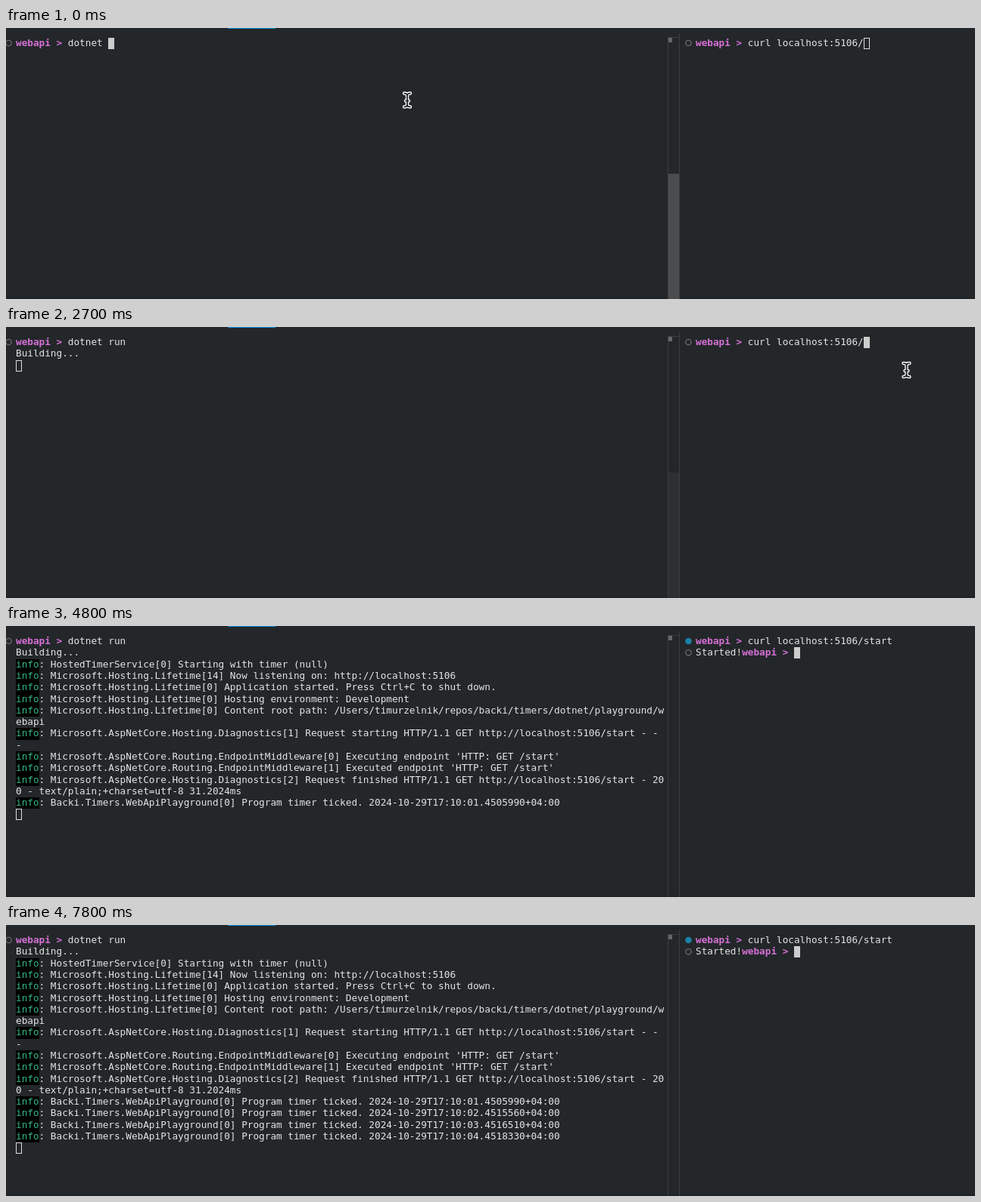
Animation of 1280 by 359 pixels, one loop 8 s. Source, as an HTML page with a canvas:

```html
<!DOCTYPE html>
<html lang="en">
<head>
<meta charset="utf-8">
<title>Terminal session</title>
<style>
html, body { margin: 0; width: 100%; height: 100%; overflow: hidden; background: #232729; }
canvas { display: block; }
</style>
</head>
<body>
<canvas id="stage" width="1280" height="359"></canvas>
<script>
const ctx = document.getElementById('stage').getContext('2d');
const LOOP = 8000, TICK = 100;
const CELL = 7.645, ROW = 15.28, TOP = 13, COLS = 112;
const LEFT = 13, RIGHT = 911;
const FONT = '12.7px "DejaVu Sans Mono", "Noto Sans Mono", monospace';
const BG = '#232729', TEXT = '#e4e4e4', PINK = '#d670d6', GREEN = '#35b883';
const PROMPT = 'webapi > ';

// Server output: [time, line]
const HOST = 'Microsoft.Hosting.Lifetime', ASP = 'Microsoft.AspNetCore.';
const URL = 'http://localhost:5106';
const tick = (sec, frac) =>
  `info: Backi.Timers.WebApiPlayground[0] Program timer ticked. 2024-10-29T17:10:0${sec}.${frac}+04:00`;
const log = [
  [1800, 'Building...'],
  [2800, 'info: HostedTimerService[0] Starting with timer (null)'],
  [2800, `info: ${HOST}[14] Now listening on: ${URL}`],
  [2800, `info: ${HOST}[0] Application started. Press Ctrl+C to shut down.`],
  [2800, `info: ${HOST}[0] Hosting environment: Development`],
  [2800, `info: ${HOST}[0] Content root path: /Users/timurzelnik/repos/backi/timers/dotnet/playground/webapi`],
  [4800, `info: ${ASP}Hosting.Diagnostics[1] Request starting HTTP/1.1 GET ${URL}/start - - -`],
  [4800, `info: ${ASP}Routing.EndpointMiddleware[0] Executing endpoint 'HTTP: GET /start'`],
  [4800, `info: ${ASP}Routing.EndpointMiddleware[1] Executed endpoint 'HTTP: GET /start'`],
  [4800, `info: ${ASP}Hosting.Diagnostics[2] Request finished HTTP/1.1 GET ${URL}/start - 200 - text/plain;+charset=utf-8 31.2024ms`],
  [4800, tick(1, '4505990')],
  [5800, tick(2, '4515560')],
  [6800, tick(3, '4516510')],
  [7800, tick(4, '4518330')]
];

// Key press times
const runKeys = [800, 1000, 1200], startKeys = [3600, 3800, 4000, 4300, 4500];
const RUN = 1600, FOCUS = 2600, CURL = 4700, REPLY = 4800;
const pointerPath = [[2000, 530, 95.5], [2400, 1233, 62], [2700, 1189.5, 57]];

function rect(x, y, w, h, color) {
  ctx.fillStyle = color;
  ctx.fillRect(x, y, w, h);
}

// Each glyph sits in its own terminal cell
function print(x, row, text, color = TEXT, bold = false) {
  ctx.font = (bold ? 'bold ' : '') + FONT;
  ctx.fillStyle = color;
  [...text].forEach((ch, i) => ctx.fillText(ch, x + i * CELL, TOP + 11.2 + row * ROW));
}

function prompt(x, row, command) {
  print(x, row, PROMPT, PINK, true);
  print(x + PROMPT.length * CELL, row, command);
}

function typed(base, word, keys, t) {
  return base + word.slice(0, keys.filter(k => k <= t).length);
}

function caret(x, row, col, focused) {
  const px = Math.round(x + col * CELL), py = Math.round(TOP + row * ROW);
  if (focused) return rect(px, py, 8, 15, '#cccccc');
  ctx.strokeStyle = '#e0e0e0';
  ctx.lineWidth = 1;
  ctx.strokeRect(px + .5, py + .5, 7, 14);
}

function dot(x, row, done) {
  ctx.beginPath();
  ctx.arc(x, 20 + row * ROW, done ? 4.3 : 3.7, 0, 7);
  ctx.fillStyle = '#1b81a8';
  ctx.strokeStyle = '#6a6c6d';
  ctx.lineWidth = 1.3;
  done ? ctx.fill() : ctx.stroke();
}

function pointer(x, y) {
  const beam = new Path2D('M-4-9Q0-9 0-6V6Q0 9-4 9M4-9Q0-9 0-6M0 6Q0 9 4 9M-2 1H2');
  ctx.save();
  ctx.translate(x, y);
  ctx.lineCap = 'round';
  for (const [color, width] of [['#fff', 4.4], ['#151718', 1.7]]) {
    ctx.strokeStyle = color;
    ctx.lineWidth = width;
    ctx.stroke(beam);
  }
  ctx.restore();
}

function pointerAt(t) {
  if (t < 800) return pointerPath[0].slice(1);
  if (t < 2000 || t >= startKeys[0]) return null;
  const i = pointerPath.findIndex(p => p[0] > t);
  if (i < 0) return pointerPath[2].slice(1);
  const [t0, x0, y0] = pointerPath[i - 1], [t1, x1, y1] = pointerPath[i];
  const u = (t - t0) / (t1 - t0), e = u * u * (3 - 2 * u);
  return [x0 + (x1 - x0) * e, y0 + (y1 - y0) * e];
}

function chrome(t) {
  rect(0, 0, 1280, 359, BG);
  rect(0, 357, 1280, 2, '#1f2224');
  rect(293, 0, 63, 1, '#0e8fe0');
  ctx.globalAlpha = Math.min(1, Math.max(0, (2900 - t) / 800));
  rect(875, 193, 14, 166, '#4b4c4d');
  ctx.globalAlpha = 1;
  rect(874, 12, 1, 347, '#3b3e40');
  rect(889, 7, 1, 352, '#3b3e40');
  rect(874, 12, 15, 1, '#3b3e40');
  rect(875, 13, 5, 6, '#65686a');
}

function server(t) {
  const command = typed('dotnet ', 'run', runKeys, t);
  dot(3.5, 0);
  prompt(LEFT, 0, command);
  if (t < RUN) return caret(LEFT, 0, PROMPT.length + command.length, true);
  let row = 1;
  for (const [time, line] of log) {
    if (time > t) break;
    const tagged = line.startsWith('info');
    if (tagged) {
      const y = Math.round(TOP + row * ROW);
      rect(LEFT, y, 31, Math.round(TOP + (row + 1) * ROW) - y, '#000');
      print(LEFT, row, 'info', GREEN);
    }
    const text = tagged ? '    ' + line.slice(4) : line;
    for (let i = 0; i < text.length; i += COLS) print(LEFT, row++, text.slice(i, i + COLS));
  }
  caret(LEFT, row, 0, t < FOCUS);
}

function client(t) {
  const command = typed('curl localhost:5106/', 'start', startKeys, t);
  const replied = t >= REPLY;
  dot(901.5, 0, replied);
  prompt(RIGHT, 0, command);
  if (t < CURL) return caret(RIGHT, 0, PROMPT.length + command.length, t >= FOCUS);
  if (!replied) return caret(RIGHT, 1, 0, true);
  const reply = 'Started!';
  dot(901.5, 1);
  print(RIGHT, 1, reply);
  prompt(RIGHT + reply.length * CELL, 1, '');
  caret(RIGHT, 1, reply.length + PROMPT.length, true);
}

function frame() {
  const t = Math.floor(performance.now() % LOOP / TICK) * TICK;
  chrome(t);
  server(t);
  client(t);
  const at = pointerAt(t);
  if (at) pointer(...at);
  requestAnimationFrame(frame);
}
frame();
</script>
</body>
</html>
```
